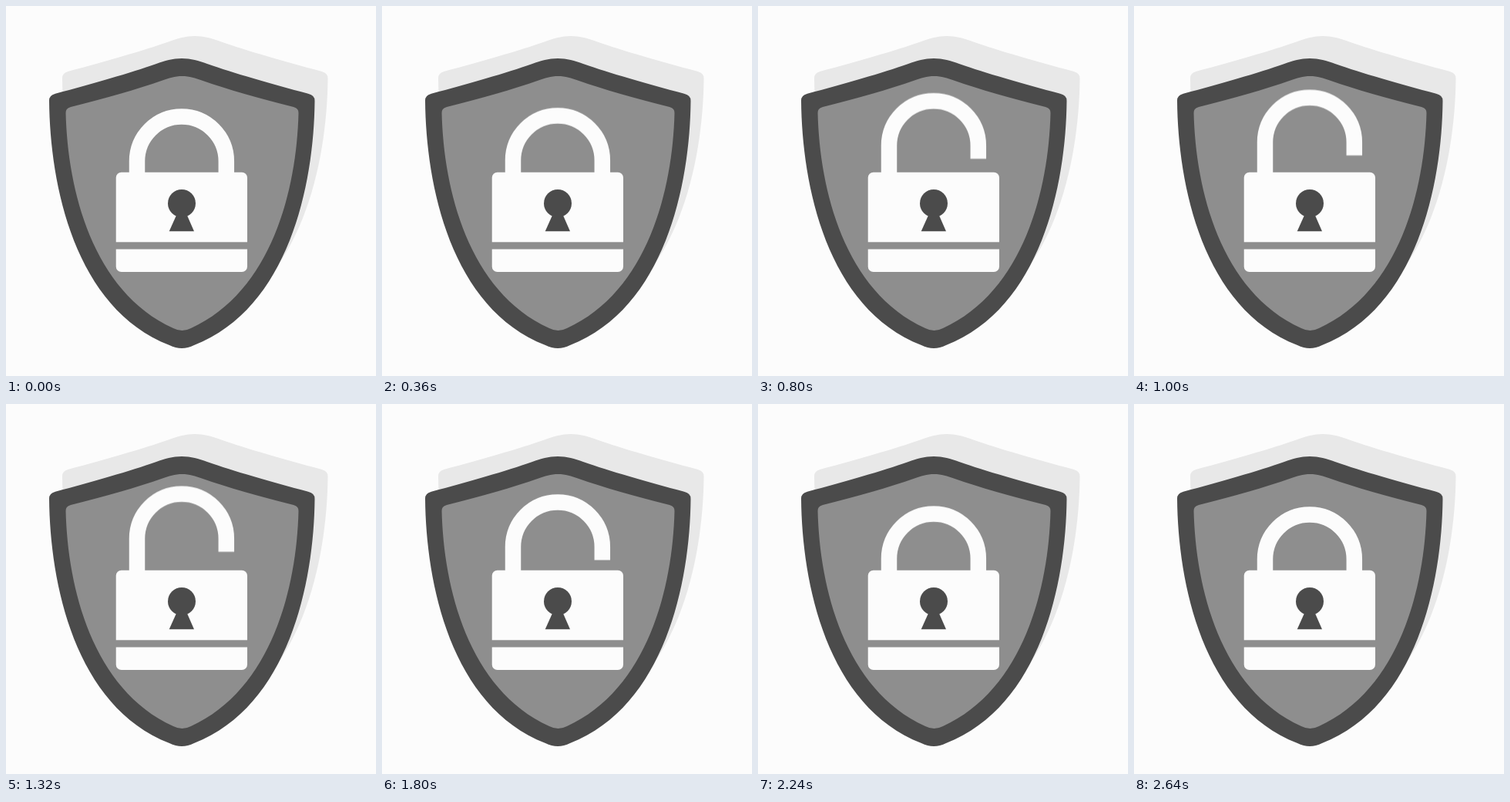
An HTML page that plays this animation: 480 by 480 pixels, repeating every 2800 ms.

```html
<!DOCTYPE html>
<html lang="en">
<head>
<meta charset="utf-8">
<title>Shield and padlock</title>
<style>
  html, body { margin: 0; width: 100%; height: 100%; overflow: hidden; background: #fcfcfc; }
  svg { display: block; width: 100vw; height: 100vh; }
  .shadow { fill: #e8e8e8; }
  .dark { fill: #4b4b4b; }
  .mid { fill: #8e8e8e; }
  .light { fill: #fcfcfc; }
  #shackle { fill: none; stroke: #fcfcfc; stroke-width: 20.5; }
</style>
</head>
<body>
<svg viewBox="0 0 480 480">
  <defs>
    <path id="shield" d="M228 68 C240 68 250 71 261 75 C295 87 344 101 392 113.7 Q401 116 400.5 123
      C399.5 232 367 392 244 440 Q228 448 212 440 C89 392 57 232 56 123 Q55.5 116 64 113.7
      C112 101 161 87 195 75 C206 71 216 68 228 68 Z"/>
  </defs>
  <use href="#shield" class="shadow" x="17" y="-29"/>
  <use href="#shield" class="dark"/>
  <path class="mid" d="M228.5 91 C238 91 246 93.5 254 96.5 C288 108.5 328 119.5 373 131 Q380 133 379.5 139
    C377 238 345 370 240 418 Q228.5 424 217 418 C112 370 80 238 77.5 139 Q77 133 84 131
    C129 119.5 169 108.5 203 96.5 C211 93.5 219 91 228.5 91 Z"/>
  <path id="shackle" d="M170 260 V201.5 a57.9 57.9 0 0 1 115.8 0 V218.4"/>
  <rect class="light" x="142.7" y="215.7" width="170.3" height="129.3" rx="7"/>
  <rect class="mid" x="142" y="306.3" width="172" height="9.2"/>
  <circle class="dark" cx="228" cy="256" r="18"/>
  <path class="dark" d="M223.5 266 L211.7 292.3 H244 L232.5 266 Z"/>
</svg>
<script>
  const LOOP = 2800;
  const STEP = 40;
  const LIFT = -26.8;

  // [time in ms, vertical shift, easing towards the next pose]
  const poses = [
    [0, 0, 'linear'],
    [300, 0, 'cubic-bezier(.23, .1, .33, 1)'],
    [1320, LIFT, 'linear'],
    [1610, LIFT, 'cubic-bezier(.34, .4, .04, 1.04)'],
    [2640, 0, 'linear'],
    [LOOP, 0, 'linear'],
  ];

  const frames = poses.map(([time, y, easing]) => ({
    offset: time / LOOP,
    transform: `translateY(${y}px)`,
    easing,
  }));

  document.getElementById('shackle').animate(frames, {
    duration: LOOP,
    iterations: Infinity,
    easing: `steps(${LOOP / STEP})`,
    delay: -4,
  });
</script>
</body>
</html>
```
